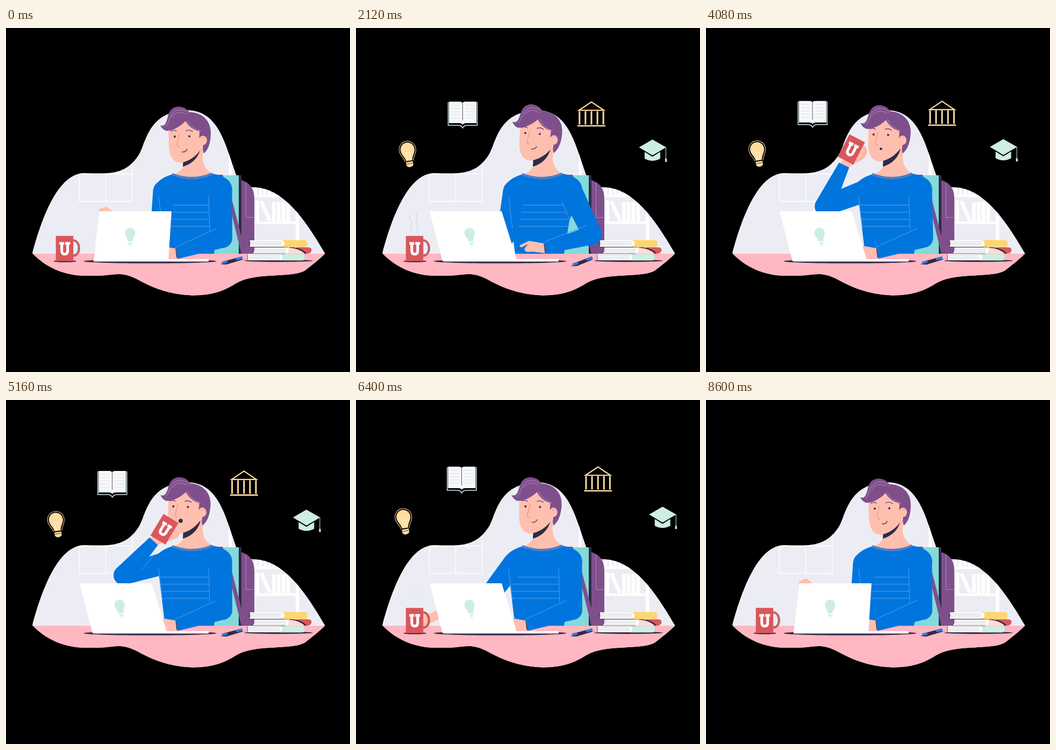
Animation of 640 by 640 pixels, one loop 8.64 s. Source, as an HTML page:

```html
<!DOCTYPE html>
<html lang="en">
<head>
<meta charset="utf-8">
<title>Study desk</title>
<style>
html,body{margin:0;width:100%;height:100%;overflow:hidden;background:#000}
svg{display:block;width:100vw;height:100vh}
.w{fill:#fff}
.skin{fill:#ffbfae}
.blue{fill:#0075de}
.dark{fill:#2f2b44}
.mint{fill:#cdeee0}
.plum{fill:#7f4f8c}
.gold{fill:#ffdca0}
.red{fill:#d9575c}
.ln{fill:none;stroke:#559fe8;stroke-width:1}
.hl{fill:none;stroke:#b58fc0;stroke-width:.9}
.br{fill:none;stroke:#7f4f8c;stroke-width:1.6;stroke-linecap:round}
.dash{fill:none;stroke:#fff}
</style>
</head>
<body>
<svg viewBox="0 0 640 640">
<defs>
<clipPath id="blob"><path d="M49 419C68 348 98 271 145 270C190 271 222 275 247 236C262 210 265 154 340 153C396 156 408 216 427 270C434 294 450 296 470 297C520 304 558 358 593.5 419.5C584 430 568 442 555 452C540 459 520 459 500 460.5C470 462 447 464 428 475C408 487 390 497 347 497.5C304 496 272 483 247 469C225 457 212 457 195 459C180 461 165 461 150 461C105 461 72 443 49 419Z"/></clipPath>
</defs>

<g clip-path="url(#blob)">
  <path fill="#ecedf4" d="M0 0H640V640H0Z"/>
  <path class="dash" stroke-width="1.3" d="M136.500 240V322.500H235V240M185.500 240V322M136 271.500H235"/>
  <path class="w" d="M414.500 200H420V420H414.500ZM539 300H545.500V420H539ZM462 310H540V314.500H462ZM462 360H540V364.500H462ZM464.500 321H471V360H464.500ZM472 324L478 321L494 357L488 360Z"/>
  <path class="dash" stroke-width="16" stroke-dasharray="5.5 3" d="M462 302H510"/>
  <path class="dash" stroke-width="36" stroke-dasharray="6.8 2" d="M495 342H530"/>
</g>

<path fill="#85d9da" d="M380 274H433V420H380Z"/>
<path class="dark" d="M433 274H438V420H433Z"/>
<path class="plum" d="M438 283Q462 290 462 318V420H438ZM392 273H403L421 322L438 388V420L431 392L416 330Z"/>
<path class="hl" d="M446.500 288V352.500H461"/>

<path class="skin" d="M330 235V257Q326 266 312 273Q347 290 384 271Q368 262 366 245V222Z"/>
<path class="dark" d="M329 258L330 238L362 225Q355 250 329 258Z"/>
<path class="blue" d="M310 272Q347 286 384 271Q421 277 421 302L397 358L387 420H296L285 330L274 305Q276 282 310 272Z"/>
<g clip-path="url(#blob)"><path fill="#ffb7c2" d="M0 420H640V520H0Z"/></g>

<g id="head">
  <path class="skin" d="M302 186L303 218Q304 250 326 251Q350 245 363 225L368 215L362 178L330 165Z"/>
  <g id="face">
    <path class="br" d="M307 192Q312 189 317 192M335 191.500Q341 188 347 192.500"/>
    <g id="eyes" class="dark"><ellipse cx="314" cy="202" rx="1.900"/><ellipse cx="341" cy="201.500" rx="1.900"/></g>
    <path fill="none" stroke="#d98f88" d="M322.500 196L318 218.500Q319 222 324 221.500"/>
    <path id="smile" fill="none" stroke="#2f2b44" stroke-width="1.300" stroke-linecap="round" d="M328 230.500Q334 231.500 337 225.500"/>
    <circle id="mouth" class="dark" cx="329" cy="228"/>
  </g>
  <path class="plum" d="M287 181C298 185 299 171 302 161C307 146 319 145 327 147Q336 149 341 156.500C366 157 381 173 381 195C381 214 376 227 368 233.500Q365 228 367 214L359.500 205L360 192C348 190 338 181 334 173C325 183 308 193 297 191Q290 188 287 181Z"/>
  <path class="hl" d="M297 184Q303 177 305 167Q310 153 322 152Q334 152 341 160M309 166Q314 157 325 157L335 160M337 172Q344 187 363 192"/>
  <ellipse class="skin" cx="366.500" cy="209" rx="7.500" ry="8.800"/>
  <path fill="none" stroke="#e39c92" d="M363 206Q367 201 371 205"/>
</g>

<path fill="none" stroke="#3f75c6" stroke-width="4.500" d="M309 272Q347 287 384 271"/>
<path fill="none" stroke="#6d9ce0" stroke-width="3" stroke-dasharray="1 2.500" d="M310 272.500Q347 287 383 271.500"/>
<path id="stripes" class="ln"/>
<path id="handMug" stroke="#ffbfae" stroke-width="17" stroke-linecap="round"/>
<path id="armL" class="blue"/>
<path id="foldL" class="ln" d="M274 291L252 316"/>
<path class="ln" d="M284 313.500L291 373"/>
<path id="armR" class="blue"/>
<path id="foldR" class="ln"/>
<g id="handR"><path class="skin" d="M1 -9L-28 -14L-45 -6Q-47 -3 -42 -2L-30 -8L-37 1Q-36 6 -30 7L-22 6L2 9Z"/><path stroke="#2f2b44" stroke-width="1.300" d="M0 -9L2 8"/></g>
<path id="handLid" class="skin" d="M-27 -21L-13 -26L-2 -17L0 0L-24 0Z"/>

<g id="book">
  <path fill="#f7f8fc" d="M-25 -24H-5Q-1 -24 0 -21Q1 -24 6 -24H26V16H7Q2 16 .5 19Q-1 16 -6 16H-25Z"/>
  <path fill="none" stroke="#dfe1ec" stroke-width="17" stroke-dasharray="1.200 4.800" d="M-13 -18V12M14 -18V12"/>
  <path stroke="#555" d="M.3 -21V11"/>
  <path fill="none" stroke="#cdeee0" stroke-width="1.500" d="M-26.500 -23V20H-8Q-2 20 .5 25Q3 20 9 20H27.500V-23"/>
</g>
<g id="bank" fill="none" stroke="#ffdca0">
  <path stroke-width="2.200" d="M-23 -7L0 -22.500L23 -7Z"/>
  <path stroke-width="25" stroke-dasharray="3 8.100" d="M-23.700 7H24"/>
  <path stroke-width="2.600" d="M-26 22H26"/>
</g>
<g id="cap">
  <path class="mint" d="M-25.500 -6L-.5 -20.500L25 -6L-.5 9ZM-15 2.500L-.5 11.500L14 2.500V15Q-.5 23 -15 15Z"/>
  <path stroke="#cdeee0" d="M24.500 -6V15"/>
  <path class="mint" d="M23 15H26L26.500 21H23Z"/>
</g>
<g id="bulb"><g transform="rotate(-9)">
  <path fill="none" stroke="#ffdca0" d="M-8 14C-8 6 -15.500 3 -15.500 -8A15.500 15.500 0 0 1 15.500 -8C15.500 3 8 6 8 14"/>
  <path class="gold" d="M-6 13C-6 5 -13 1 -13 -8A13 13 0 0 1 13 -8C13 1 6 5 6 13ZM-6.500 15H6.500V21Q5 25 0 25Q-5 25 -6.500 21Z"/>
  <path fill="none" stroke="#fff3d8" stroke-width="1.100" d="M-2 13L-4 -3Q-1 1 0 -3Q1 1 4 -3L2 13"/>
  <path stroke="#000" stroke-opacity=".7" d="M-6 18.500H6"/>
</g></g>

<ellipse id="mugShade" class="dark" cx="109.500" cy="434" rx="21.500" ry="1.800"/>
<g id="steam" fill="none" stroke="#cdced9"><path d="M-5 -30C-8 -42 0 -48 -4 -56C-7 -62 -3 -66 -2 -69"/><path d="M5 -32C10 -42 2 -46 7 -54C11 -58 9 -62 8 -66"/></g>
<g id="mug">
  <ellipse id="grip" class="skin" cx="19" cy="-3" rx="10" ry="13"/>
  <g id="handle" fill="none">
    <path stroke="#d9575c" stroke-width="3" d="M16 -16C31 -14 31 13 16 14"/>
    <path stroke="#2f2b44" stroke-width=".8" d="M16 -14C28 -12 28 11 16 12"/>
  </g>
  <path class="red" d="M-16.500 -23.500H16V23.500H-16.500Z"/>
  <path class="w" d="M-10 -12H-1V-7H-3V4Q-3 8 0 8Q3 8 3 4V-7H1V-12H10V-7H8V4Q8 13 0 13Q-8 13 -8 4V-7H-10Z"/>
</g>

<ellipse class="dark" cx="268" cy="434" rx="123.500" ry="3.800"/>
<path class="w" d="M163 430H377V434.500H163Z"/>
<path id="lid" class="w"/>
<path id="badge" class="mint" d="M-4 9C-5 2 -9.500 0 -9.500 -7A9.500 9.500 0 0 1 9.500 -7C9.500 0 5 2 4 9ZM-4 11H4V13.500H-4ZM-2.500 14.500H2.500L1.500 17H-1.500Z"/>

<g id="pen">
  <path class="dark" d="M398 439L443 430L447 429L410 440Z"/>
  <path stroke="#2f2b44" stroke-width="5.500" d="M403 437.500L439 428"/>
  <path stroke="#2b7ce0" stroke-width="4.500" d="M402 437L412 434.300M428 430.200L440 427"/>
</g>

<ellipse class="dark" cx="507" cy="433" rx="64" ry="2.200"/>
<path class="red" d="M540 408H560Q569 407 568.500 414Q567 420 558 420H550Z"/>
<path fill="#ffd9d8" d="M522 408Q547 407 557 420H518Z"/>
<path class="dark" d="M526 407.500Q550 408 559 419L556 420Q546 410 526 408.500Z"/>
<path fill="#ffd571" d="M512 394.500H556Q561 395 561 401Q561 407 556 407.500H512Z"/>
<path class="mint" d="M508 420.500H551Q556 421 556 426.500Q556 432 551 432.500H508Z"/>
<path class="w" d="M453 395H514Q519 397 518 402Q517 407 512 407H453Q456 401 453 395ZM463 408H522Q527 410 526 414Q525 420 519 420H459Q464 414 463 408ZM449 420.500H510Q515 423 514 427Q513 432 508 432.500H449Q452 427 449 420.500Z"/>
<g fill="none" stroke="#b9bac8" stroke-dasharray=".8 2.200"><path stroke-width="58" d="M484 397.500V404.500M492 411V418M480 423V430"/></g>
<path fill="none" stroke="#2f2b44" stroke-width=".7" d="M453 394.500V407.500H516M462 408H524M459 420H520M449 420.500V432.500H510"/>
</svg>

<script>
const LOOP = 8640, STEP = 40;
const LAPTOP = [228, 384];
// Icons fly out from the laptop at "out" and back to it at "back"
const icons = [
  { id: 'bulb', home: [97, 234], out: 490, back: 7015 },
  { id: 'book', home: [198, 161], out: 695, back: 7180 },
  { id: 'bank', home: [438, 160], out: 435, back: 7290 },
  { id: 'cap', home: [552, 228], out: 390, back: 7490 }
];

const el = id => document.getElementById(id);
const set = (id, name, value) => el(id).setAttribute(name, value);
const show = (id, amount) => set(id, 'opacity', +amount);
const move = (id, [x, y], more = '') => set(id, 'transform', `translate(${x} ${y})${more}`);

const mix = (a, b, k) => a.map((v, i) => v + (b[i] - v) * k);
const polar = ([x, y], r, deg) => {
  const a = deg * Math.PI / 180;
  return [x + r * Math.cos(a), y + r * Math.sin(a)];
};
function ease(t, from, to) {
  const u = Math.min(1, Math.max(0, (t - from) / (to - from)));
  return u * u * (3 - 2 * u);
}
// Rises from a to b, holds, falls from c to d
const pulse = (t, a, b, c, d) => ease(t, a, b) - ease(t, c, d);

const disc = ([x, y], r) => `M${x - r} ${y}a${r} ${r} 0 1 0 ${2 * r} 0a${r} ${r} 0 1 0 ${-2 * r} 0Z`;
function taper([ax, ay], ra, [bx, by], rb) {
  const len = Math.hypot(bx - ax, by - ay) || 1;
  const nx = (ay - by) / len, ny = (bx - ax) / len;
  return `M${ax + nx * ra} ${ay + ny * ra}L${bx + nx * rb} ${by + ny * rb}`
    + `L${bx - nx * rb} ${by - ny * rb}L${ax - nx * ra} ${ay - ny * ra}Z`;
}
const arm = (shoulder, elbow, wrist) =>
  taper(shoulder, 20.5, elbow, 18) + taper(elbow, 18, wrist, 10.5) + disc(shoulder, 20.5) + disc(elbow, 18);

function drawHead({ awake, look, glance, sip }) {
  const open = Math.max(look, sip ** 4);
  move('head', [look + 5 * glance - 2 * sip, -2 * look], ` rotate(${3 * awake + 6.5 * look} 370 225)`);
  move('face', [3 * glance - 6 * look - 2 * sip, -awake - 2.5 * look]);
  for (const eye of el('eyes').children) eye.setAttribute('ry', 2 - look);
  show('smile', open < .3);
  show('mouth', open >= .3);
  set('mouth', 'r', 3.8 * open);
}

function drawRight({ type }) {
  const elbow = mix([403, 391], [440, 385], type), wrist = mix([316, 419.5], [350, 410], type);
  set('armR', 'd', arm([400, 302], elbow, wrist));
  move('handR', wrist);

  const [ax, ay] = mix([377, 313], [383, 323], type), [bx, by] = mix([379, 378], [398, 357], type);
  set('foldR', 'd', `M${ax} ${ay}L${bx} ${by}M${elbow[0] - 11} ${elbow[1] - 18}L${wrist[0] - 2} ${wrist[1] - 11}`);
  let d = '';
  for (let i = 0; i < 4; i++) {
    const y = 329.5 + 13.2 * i;
    d += `M${286 + 1.5 * i} ${y}H${Math.min(396, ax + (bx - ax) * (y - ay) / (by - ay))}`;
  }
  set('stripes', 'd', d);
}

function drawLeft(t, { lid, pull, reach, sip, glance }) {
  // The forearm swings the mug around the elbow
  const raised = mix([238, 377], [218, 326], sip), angle = 165.5 + 146.5 * sip;
  const mug = polar(raised, 133 - 18 * sip, angle), turn = 31 * sip - 6 * glance;
  const desk = mix([240, 400], [200 - 35 * lid, 358], pull);
  const elbow = mix([286, 386], raised, reach), wrist = mix(desk, polar(raised, 85, angle), reach);
  set('armL', 'd', arm([294, 304], elbow, wrist));
  show('foldL', sip ** 8);

  show('handLid', reach < .3);
  show('handMug', reach >= .3);
  show('grip', reach === 1);
  show('handle', 1 - sip);
  move('handLid', wrist);
  const [gx, gy] = polar(mug, 20, turn), [wx, wy] = wrist;
  const k = Math.min(1, 34 / Math.hypot(gx - wx, gy - wy));
  set('handMug', 'd', `M${wx} ${wy}L${mix(wrist, [gx, gy], k).join(' ')}`);
  move('mug', mug, ` rotate(${turn})`);

  const lift = Math.max(0, 410.5 - mug[1]);
  show('mugShade', Math.max(0, 1 - lift / 22));
  set('mugShade', 'rx', Math.max(8, 21.5 - lift * .42));
  show('steam', pulse(t, 500, 1100, 2400, 3400) + pulse(t, 6200, 7200, 7800, 8400));
  move('steam', [mug[0] + Math.sin(t / 350), mug[1] + 2], ` scale(${Math.cos(t / 700) > 0 ? 1 : -1} 1)`);
}

function drawLaptop({ lid }) {
  set('lid', 'd', `M${174 - 37 * lid} 341H${308 - 37 * lid}L${302 - 2 * lid} 434H${163 - 2 * lid}Z`);
  move('badge', [231 - 18.5 * lid, 388], ` rotate(${-11 * lid})`);
}

function drawIcons(t) {
  const drift = .058 * Math.max(0, (t - 3080) / 3320) ** 2 * (1 - ease(t, 6400, 7100));
  for (const { id, home, out, back } of icons) {
    const far = pulse(t, out, out + 900, back, back + 1300);
    show(id, far > 0);
    move(id, mix(LAPTOP, home, far * (1 + drift)), ` scale(${Math.min(1, .4 + 2 * far)})`);
  }
}

function draw(t) {
  const pose = {
    lid: pulse(t, 150, 620, 7950, 8430),
    pull: 1 - pulse(t, 620, 950, 7050, 7850),
    awake: pulse(t, 400, 1150, 7600, 8450),
    look: pulse(t, 400, 1150, 1500, 2400),
    type: pulse(t, 400, 1200, 2560, 4300),
    reach: pulse(t, 2000, 2550, 6450, 7000),
    glance: pulse(t, 2350, 3000, 3100, 4000),
    sip: pulse(t, 2867, 4400, 5250, 6250)
  };
  drawHead(pose);
  drawRight(pose);
  drawLeft(t, pose);
  drawLaptop(pose);
  drawIcons(t);
  set('pen', 'transform', `rotate(${-6 * pose.type} 438 428)`);
}

const start = performance.now();
function tick() {
  const t = Math.max(0, performance.now() - start) % LOOP;
  draw(Math.floor(t / STEP) * STEP);
  requestAnimationFrame(tick);
}
tick();
</script>
</body>
</html>
```
